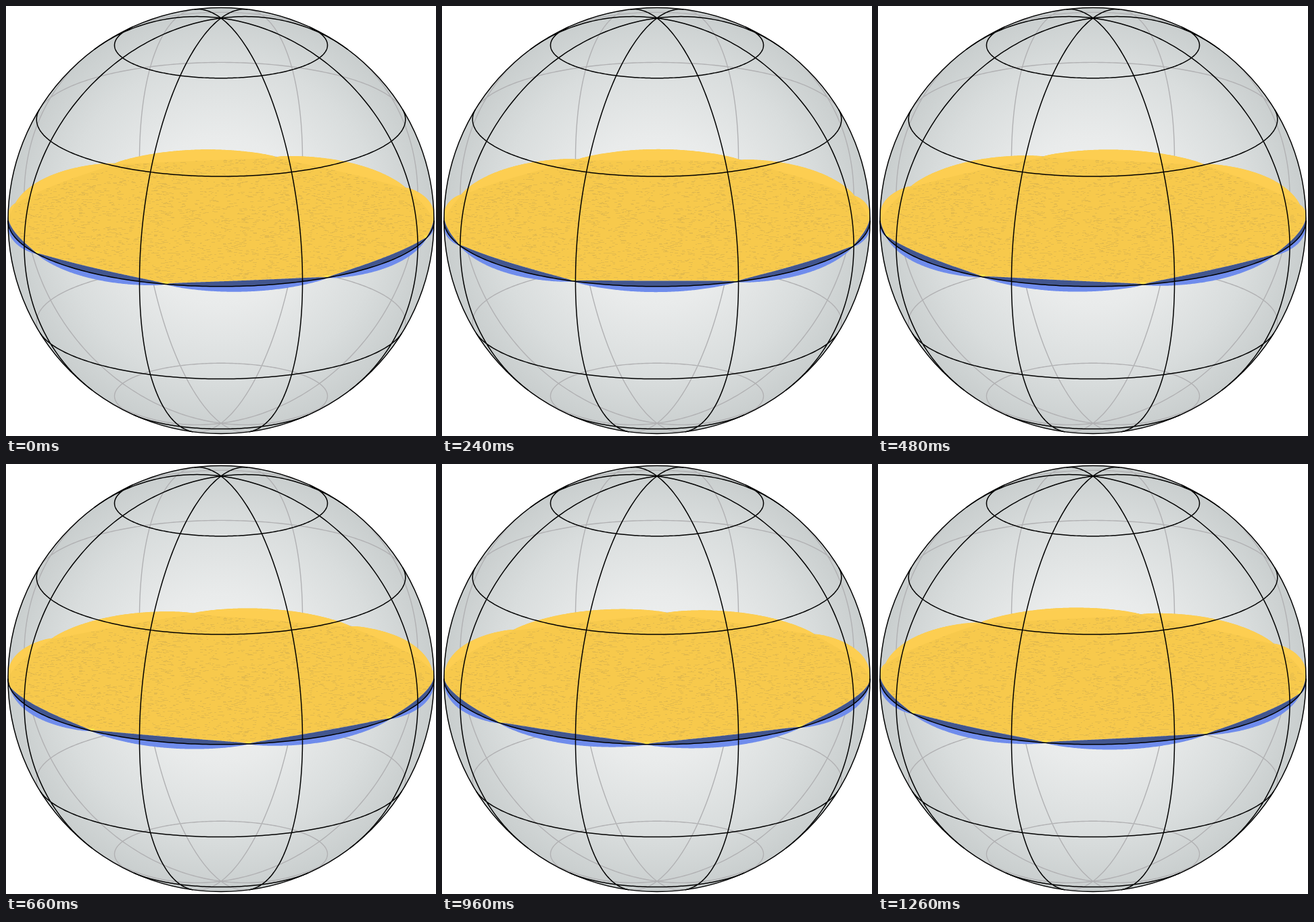
An HTML page with a canvas for the animation above (1.32 s loop, 636 px wide and 636 px high).

```html
<!DOCTYPE html>
<html lang="en">
<head>
<meta charset="utf-8">
<title>Rotating wave on a sphere</title>
<style>
html, body { margin: 0; width: 100%; height: 100%; overflow: hidden; background: #fff; }
canvas { display: block; width: 636px; height: 636px; }
</style>
</head>
<body>
<canvas id="stage" width="636" height="636"></canvas>
<script>
const ctx = document.getElementById('stage').getContext('2d');
const CX = 318, CY = 317.5, R = 315;
const RAD = Math.PI / 180;
const SIN = Math.sin(18 * RAD), COS = Math.cos(18 * RAD);
const LOOP = 1320, STEP = 60, LOBES = 8, LOBE = 360 / LOBES;
const HEIGHT = 8.3;

// Tilted orthographic view; longitude 0 faces the viewer.
function project(lat, lon) {
  const c = Math.cos(lat * RAD);
  const x = c * Math.sin(lon * RAD), y = Math.sin(lat * RAD), z = c * Math.cos(lon * RAD);
  return { x: CX + R * x, y: CY - R * (y * COS - z * SIN), depth: z * COS + y * SIN };
}

function gridCurves() {
  const curves = [];
  for (let lat = -60; lat <= 60; lat += 30) {
    const pts = [];
    for (let lon = -180; lon <= 180; lon += 1) pts.push(project(lat, lon));
    curves.push(pts);
  }
  for (let lon = 22.5; lon < 360; lon += 45) {
    const pts = [];
    for (let lat = -90; lat <= 90; lat += 1) pts.push(project(lat, lon));
    curves.push(pts);
  }
  return curves;
}

function gridPath(curves, front) {
  const path = new Path2D();
  for (const pts of curves) {
    let pen = false;
    for (const p of pts) {
      if ((p.depth > -1e-6) !== front) { pen = false; continue; }
      if (pen) path.lineTo(p.x, p.y); else path.moveTo(p.x, p.y);
      pen = true;
    }
  }
  return path;
}

const curves = gridCurves();
const frontGrid = gridPath(curves, true);
const backGrid = gridPath(curves, false);
const globe = new Path2D();
globe.arc(CX, CY, R, 0, 2 * Math.PI);

const shade = ctx.createRadialGradient(CX, CY, 0, CX, CY, R);
shade.addColorStop(0, '#f3f4f4');
shade.addColorStop(0.4, '#e9ebeb');
shade.addColorStop(0.75, '#d9dddd');
shade.addColorStop(1, '#c9cece');

// Faint mesh grain on the disc.
let seed = 7;
const random = () => (seed = seed * 16807 % 2147483647) / 2147483647;
const grain = new Path2D();
for (let i = 0; i < 3200; i++) {
  const r = 0.98 * Math.sqrt(random()), a = 2 * Math.PI * random();
  grain.rect(Math.round(CX + R * r * Math.cos(a)), Math.round(CY + R * SIN * r * Math.sin(a)),
    2 + Math.floor(5 * random()), 1);
}

// Edge of the wave: side 1 is above the equator, -1 below, 0 on it.
function edge(from, to, side, cusp) {
  const pts = [], n = Math.round(Math.abs(to - from) * 3);
  for (let i = 0; i <= n; i++) {
    const lon = from + (to - from) * i / n;
    const wave = Math.abs(Math.sin((lon - cusp) * Math.PI / LOBE)) ** 0.66;
    const p = project(0, lon);
    pts.push([p.x, p.y - side * HEIGHT * wave]);
  }
  return pts;
}

function shape(...edges) {
  const path = new Path2D();
  edges.flat().forEach(([x, y], i) => i ? path.lineTo(x, y) : path.moveTo(x, y));
  path.closePath();
  return path;
}

function fill(path, color) {
  ctx.fillStyle = color;
  ctx.fill(path);
}

function stroke(path, color, width) {
  ctx.strokeStyle = color;
  ctx.lineWidth = width;
  ctx.stroke(path);
}

function drawGlints(cusp) {
  for (let i = 0; i < LOBES; i++) {
    const p = project(0, cusp + i * LOBE);
    if (p.depth < 0.15) continue;
    fill(shape([[p.x - 5, p.y - 3.5], [p.x + 5, p.y - 3.5], [p.x + 2, p.y + 1], [p.x - 2, p.y + 1]]), '#ffe14a');
  }
}

function draw(step) {
  const cusp = -15 - LOBE * step * STEP / LOOP;
  ctx.clearRect(0, 0, 636, 636);
  fill(globe, shade);
  stroke(backGrid, '#b1b1b3', 1.4);

  const disc = shape(edge(-90, 90, 1, cusp), edge(90, 270, 1, cusp));
  const middle = edge(-90, 90, 0, cusp);
  fill(disc, '#f7c94c');
  ctx.save();
  ctx.clip(disc);
  fill(grain, 'rgba(168, 142, 82, 0.24)');
  fill(shape(edge(90, 270, 1, cusp), edge(270, 90, -1, cusp)), '#fdce51');
  drawGlints(cusp);
  ctx.restore();

  fill(shape(middle, edge(90, -90, -1, cusp)), '#6f8cec');
  fill(shape(middle, edge(90, -90, 1, cusp)), '#42568f');

  stroke(frontGrid, '#000', 1.5);
  stroke(globe, '#000', 1.5);
}

let shown = -1;
function tick() {
  const step = Math.floor(performance.now() % LOOP / STEP);
  if (step !== shown) draw(shown = step);
  requestAnimationFrame(tick);
}
tick();
</script>
</body>
</html>
```
